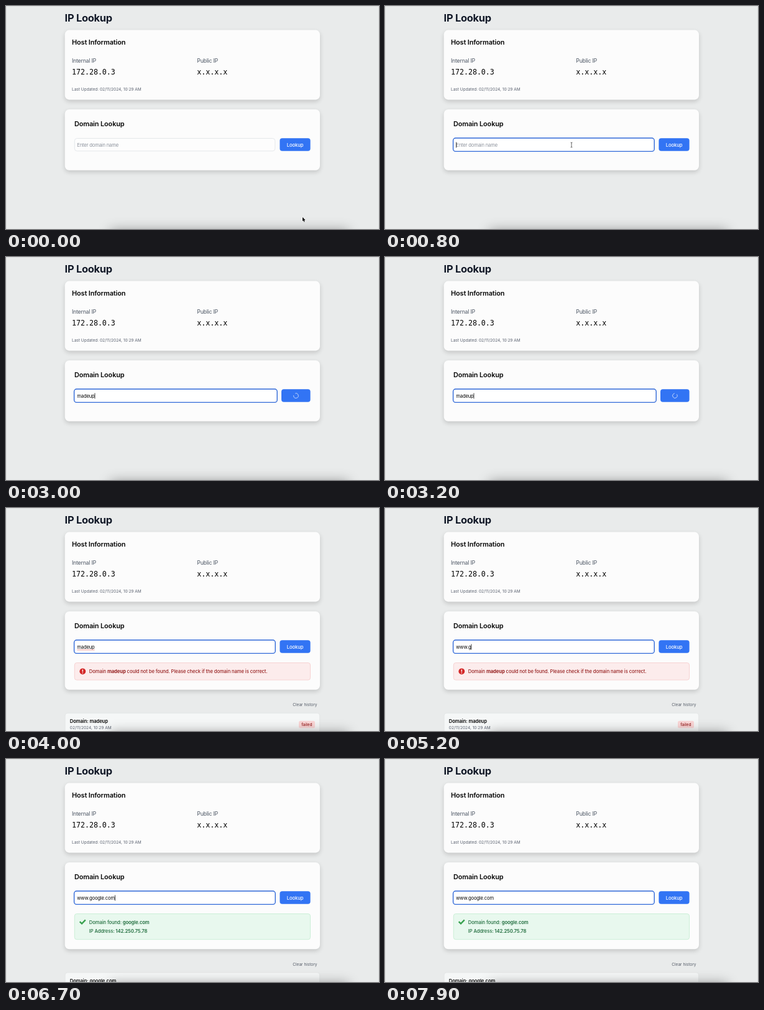
These frames come from a looping animation (600x358 px, 8 s). An HTML page with a canvas:

```html
<!DOCTYPE html>
<html lang="en">
<head>
<meta charset="utf-8">
<title>IP Lookup</title>
<style>
  html, body { margin: 0; width: 100%; height: 100%; overflow: hidden; background: #e9ebeb; }
  canvas { display: block; width: 600px; height: 358px; }
</style>
</head>
<body>
<canvas id="stage" width="600" height="358"></canvas>
<script>
const ctx = document.getElementById('stage').getContext('2d');
const LOOP = 8000, STEP = 100;
const STAMP = '02/11/2024, 10:29 AM';

// size, tracking in em
const STYLES = {
  title: [16.4, -0.016],
  heading: [10.9, -0.01],
  label: [8.72, -0.025],
  input: [7.63, -0.022],
  body: [7.63, -0.012],
  small: [6.54, 0]
};

const TIMES = {
  focus: 600,
  firstKeys: [1500, 1600, 1700, 1900, 2200, 2500],
  load: 2800,
  failed: 3400,
  secondKeys: Array.from({ length: 14 }, (_, i) => 4700 + Math.round(i * 123)),
  reload: 6600,
  found: 6700
};

const RESETS = [TIMES.focus, ...TIMES.firstKeys, TIMES.failed, ...TIMES.secondKeys];

function text(str, x, y, style, color, weight = 400) {
  const [size, tracking] = STYLES[style];
  ctx.font = `${weight} ${size}px Inter, sans-serif`;
  ctx.letterSpacing = `${tracking * size}px`;
  ctx.fillStyle = color;
  ctx.fillText(str, x, y);
  return x + ctx.measureText(str).width;
}

function mono(str, x, y) {
  ctx.font = '11.6px "DejaVu Sans Mono", monospace';
  ctx.letterSpacing = '0px';
  ctx.fillStyle = '#000';
  ctx.fillText(str, x, y);
}

function box(x, y, w, h, radius, fill, stroke, line = 1) {
  ctx.beginPath();
  ctx.roundRect(x, y, w, h, radius);
  if (fill) {
    ctx.fillStyle = fill;
    ctx.fill();
  }
  if (stroke) {
    ctx.strokeStyle = stroke;
    ctx.lineWidth = line;
    ctx.stroke();
  }
}

function polyline(points, color, width) {
  ctx.beginPath();
  points.forEach(([x, y]) => ctx.lineTo(x, y));
  ctx.strokeStyle = color;
  ctx.lineWidth = width;
  ctx.stroke();
}

function withShadow(color, blur, offset, draw) {
  ctx.save();
  ctx.shadowColor = color;
  ctx.shadowBlur = blur;
  ctx.shadowOffsetY = offset;
  draw();
  ctx.restore();
}

function card(y, bottom) {
  withShadow('rgba(0,0,0,.16)', 7, 3, () => box(94.7, y, 410.3, bottom - y, 7, '#fcfcfc'));
}

function hostCard() {
  card(38.6, 150.4);
  text('Host Information', 106, 62, 'heading', '#050505', 600);
  text('Internal IP', 106, 91, 'label', '#4b5563');
  text('Public IP', 307.3, 91, 'label', '#4b5563');
  mono('172.28.0.3', 106, 110);
  mono('x.x.x.x', 307.3, 110);
  text('Last Updated: ' + STAMP, 106, 136.4, 'small', '#5b6270');
}

function typed(t) {
  const second = TIMES.secondKeys.filter(k => k <= t).length;
  if (second) return 'www.google.com'.slice(0, second);
  return 'madeup'.slice(0, TIMES.firstKeys.filter(k => k <= t).length);
}

function caretOn(t) {
  const last = RESETS.filter(r => r <= t).pop();
  const loading = t >= TIMES.load && t < TIMES.failed;
  return loading || (last !== undefined && Math.floor((t - last) / 500) % 2 === 0);
}

function squiggle(x, end, y) {
  const points = [];
  for (let i = 0; x + i < end; i++) points.push([x + i, y + (i % 2 ? 0.4 : -0.4)]);
  polyline(points, '#e8564f', 0.7);
}

function inputField(t, loading) {
  const right = loading ? 436 : 433;
  const value = typed(t);
  if (t >= TIMES.focus) box(109.6, 212, right - 109.4, 21.4, 4, '#fff', '#2f68d8', 1.4);
  else box(110.3, 212.5, right - 110.5, 20.3, 4, '#fdfdfd', '#dfe2e6', 0.8);

  if (!value) text('Enter domain name', 114.3, 225.7, 'input', '#8d939d');
  const end = value ? text(value, 114.3, 225.7, 'input', '#0a0a0a') : 114.3;
  if (t >= TIMES.failed && t < TIMES.secondKeys[0]) squiggle(114.5, end, 227.8);
  if (caretOn(t)) {
    ctx.fillStyle = '#111';
    ctx.fillRect(end, 218.5, 0.8, 9);
  }
}

function button(t, loading) {
  const left = loading ? 443 : 440.4;
  box(left, 212.2, 489.6 - left, 20.6, 4, '#3274f4');
  if (!loading) {
    text('Lookup', 451.8, 225.7, 'body', '#fff', 500);
    return;
  }
  const start = -Math.PI * 0.6 + (t - 3000) / 1000 * Math.PI * 2;
  ctx.beginPath();
  ctx.arc(466.4, 222.7, 3.8, start, start + Math.PI * 1.65);
  ctx.strokeStyle = 'rgba(255,255,255,.85)';
  ctx.lineWidth = 0.8;
  ctx.stroke();
}

function failedMessage() {
  const color = '#972020';
  box(110.3, 248.5, 379.2, 27.6, 3.5, '#fcecec', '#f5cbcb', 0.8);
  ctx.beginPath();
  ctx.arc(123.3, 262.3, 4.9, 0, Math.PI * 2);
  ctx.fillStyle = '#d32828';
  ctx.fill();
  polyline([[123.3, 259.3], [123.3, 263]], '#fff', 1.3);
  polyline([[123.3, 264.1], [123.3, 265.4]], '#fff', 1.3);
  let x = text('Domain ', 133.8, 265.1, 'body', color, 500);
  x = text('madeup', x, 265.1, 'body', color, 700);
  text(' could not be found. Please check if the domain name is correct.', x, 265.1, 'body', color, 500);
}

function foundMessage() {
  const color = '#1d6b3b';
  box(110.3, 248.5, 379.2, 41.2, 3.5, '#e8f8ee', '#c2ecd0', 0.8);
  polyline([[118.7, 261.2], [122, 264.4], [127.8, 258.4]], '#36a04d', 2.3);
  let x = text('Domain found: ', 133.8, 265.1, 'body', color, 500);
  text('google.com', x, 265.1, 'body', color, 600);
  x = text('IP Address: ', 133.8, 278.6, 'body', color, 500);
  text('142.250.75.78', x, 278.6, 'body', color, 600);
}

function history(shift, name, failed) {
  text('Clear history', 461.2, 318.2 + shift, 'small', '#565d69');
  box(95, 329.2 + shift, 409.7, 40, 4, '#f5f7f7', '#e0e3e3', 0.8);
  text('Domain: ' + name, 102.8, 345.4 + shift, 'body', '#080808', 600);
  text(STAMP, 102.8, 355.4 + shift, 'small', '#5b6270');
  if (failed) {
    box(471, 341.8, 26, 11.4, 2.5, '#fad6d6');
    text('failed', 475.2, 349.8, 'small', '#972020', 500);
  }
}

function domainCard(t) {
  const found = t >= TIMES.found;
  const failed = t >= TIMES.failed && !found;
  const loading = (t >= TIMES.load && t < TIMES.failed) || (t >= TIMES.reload && !found);
  card(166, found ? 305.3 : failed ? 291.7 : 263.7);
  text('Domain Lookup', 110, 193.3, 'heading', '#050505', 600);
  inputField(t, loading);
  button(t, loading);
  if (failed) {
    failedMessage();
    history(0, 'madeup', true);
  }
  if (found) {
    foundMessage();
    history(13.6, 'google.com', false);
  }
}

function windowEdges() {
  withShadow('rgba(0,0,0,.42)', 20, 0, () => {
    ctx.fillStyle = '#000';
    ctx.fillRect(168, 361, 382, 40);
  });
  ctx.strokeStyle = 'rgba(0,0,0,.05)';
  ctx.lineWidth = 1;
  ctx.strokeRect(0.5, 0.5, 599, 400);
}

function pointer(t) {
  if (t >= TIMES.firstKeys[0]) return;
  const p = Math.min(t / 300, 1);
  const ease = p * p * (3 - 2 * p);
  ctx.save();
  ctx.translate(477 - 177 * ease, 339 - 116 * ease);
  if (p === 1) {
    polyline([[-1.4, -4], [0, -3.4], [1.4, -4]], '#222', 0.7);
    polyline([[0, -3.4], [0, 3.4]], '#222', 0.7);
    polyline([[-1.4, 4], [0, 3.4], [1.4, 4]], '#222', 0.7);
  } else {
    ctx.beginPath();
    [[0, 0], [0, 6.6], [1.5, 5.3], [2.5, 7.8], [3.6, 7.3], [2.6, 5], [4.6, 4.8]]
      .forEach(([x, y]) => ctx.lineTo(x, y));
    ctx.closePath();
    ctx.strokeStyle = '#fff';
    ctx.lineWidth = 1;
    ctx.stroke();
    ctx.fillStyle = '#000';
    ctx.fill();
  }
  ctx.restore();
}

function draw(t) {
  ctx.fillStyle = '#e9ebeb';
  ctx.fillRect(0, 0, 600, 358);
  text('IP Lookup', 94.6, 25.4, 'title', '#111827', 700);
  hostCard();
  domainCard(t);
  windowEdges();
  pointer(t);
}

const origin = performance.now();
function tick() {
  const t = (performance.now() - origin) % LOOP;
  draw(Math.floor(t / STEP) * STEP);
  requestAnimationFrame(tick);
}
tick();
</script>
</body>
</html>
```
